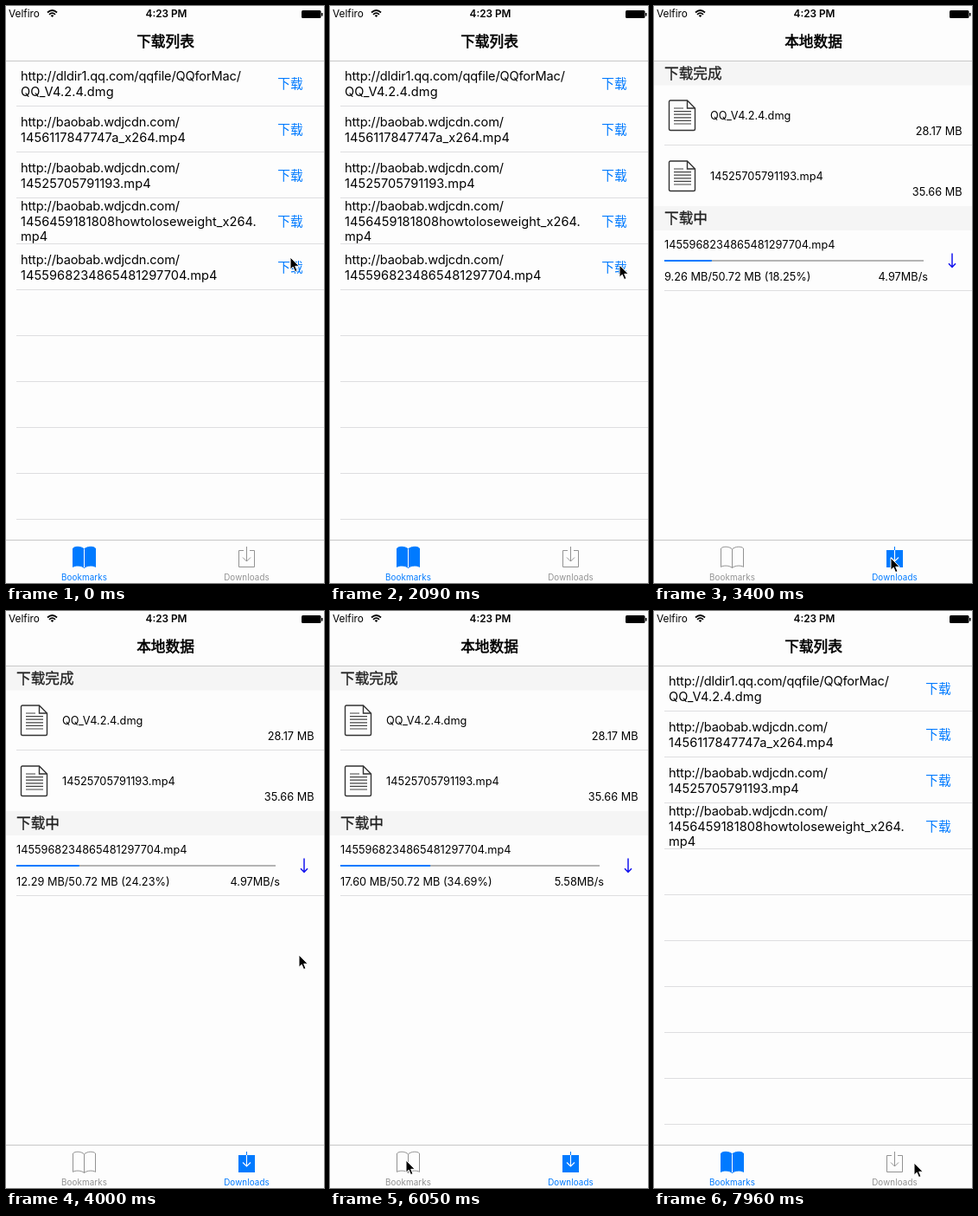
An HTML page for the animation above (8000 ms loop, 368 by 666 pixels).

```html
<!DOCTYPE html>
<html lang="zh-CN">
<head>
<meta charset="utf-8">
<style>
  html, body { margin: 0; width: 100%; height: 100%; overflow: hidden; background: #fdfdfd; }
  svg { display: block; width: 368px; height: 666px; }
  text { font-family: Inter, "Noto Sans CJK SC", "Noto Sans CJK", sans-serif; white-space: pre; }
  .status { font-size: 11.8px; }
  .title { font-size: 16.7px; text-anchor: middle; stroke: #000; stroke-width: .6px; }
  .host { font-size: 14.6px; letter-spacing: -.15px; }
  .file { font-size: 14.6px; letter-spacing: .06px; }
  .action { font-size: 14.7px; fill: #007aff; text-anchor: middle; }
  .head { font-size: 16.7px; fill: #222; stroke: #222; stroke-width: .3px; }
  .small { font-size: 12.75px; }
  .end { text-anchor: end; }
  .tab { font-size: 9.8px; letter-spacing: .12px; text-anchor: middle; }
</style>
</head>
<body>
<svg id="stage" viewBox="0 0 368 666"></svg>
<script>
const BLUE = '#007aff', GREY = '#929292', PAPER = '#fdfdfd', BAND = '#f5f5f5', EDGE = '#c8c8c8';
const LOOP = 8000, ROW = 53, LINE = 17.6;

const text = (cls, x, y, str, extra = '') => `<text class="${cls}" x="${x}" y="${y}" ${extra}>${str}</text>`;
const rect = (x, y, w, h, fill, extra = '') =>
  `<rect x="${x}" y="${y}" width="${w}" height="${h}" fill="${fill}" ${extra}/>`;
const path = (d, stroke, width = 1, fill = 'none') =>
  `<path d="${d}" stroke="${stroke}" stroke-width="${width}" fill="${fill}"/>`;
const group = (transform, body) => `<g transform="${transform}">${body}</g>`;
const rule = (x, y, color = '#dedee0') => rect(x, y, 368 - x, 1, color);
const title = str => text('title', 184.5, 47, str);
const section = (y, str) => rect(0, y, 368, 28, BAND) + text('head', 12, y + 20, str);

const urls = [
  ['http://dldir1.qq.com/qqfile/QQforMac/', 'QQ_V4.2.4.dmg'],
  ['http://baobab.wdjcdn.com/', '1456117847747a_x264.mp4'],
  ['http://baobab.wdjcdn.com/', '14525705791193.mp4'],
  ['http://baobab.wdjcdn.com/', '1456459181808howtoloseweight_x264.', 'mp4'],
  ['http://baobab.wdjcdn.com/', '1455968234865481297704.mp4'],
];

function urlRow(lines, i) {
  const middle = 89.5 + ROW * i;
  const body = lines.map((line, k) =>
    text(k ? 'file' : 'host', 17, middle + (k - (lines.length - 1) / 2) * LINE + 5.2, line));
  return `<g id="row${i}">${body.join('')}${text('action', 329, middle + 5.5, '下载')}</g>`;
}

function fileRow(y, name, size) {
  const lines = Array.from({ length: 6 }, (_, k) => `M6 ${9.5 + k * 3.6}h${k ? 20 : 11}`).join('');
  const sheet = path('M2 .5H21.5L30.5 9.5V33.5Q30.5 35 29 35H2Q.5 35 .5 33.5V2Q.5 .5 2 .5ZM21.5 .5V9.5H30.5', '#333', 1.4);
  return group(`translate(17 ${y + 17.5})`, sheet + path(lines, '#444', 1.2)) +
    text('small', 65, y + 39.5, name) + text('small end', 356.5, y + 58, size);
}

function bookIcon(active) {
  const page = path('M-13 2C-10.5 -.5 -3.5 -.5 0 3V24.5C-3.5 21.5 -10.5 21.5 -13 23.5Z',
    active ? BLUE : GREY, 1, active ? BLUE : 'none');
  return group('translate(90.5 624)', page + group('scale(-1 1)', page) +
    (active ? path('M0 3V24', PAPER) : ''));
}

function boxIcon(active) {
  const arrow = 'M0 4V17M-4.5 12.5L0 17L4.5 12.5';
  return group('translate(278.5 624)', active
    ? rect(-9.5, 4, 19, 20, BLUE) + path('M0 0V4', BLUE) + path(arrow, '#fff', 1.1)
    : path('M-3.5 4.5H-9V23.5H9V4.5H3.5M0 0V4' + arrow, GREY));
}

const tabs = active => bookIcon(active === 0) + boxIcon(active === 1) +
  ['Bookmarks', 'Downloads'].map((label, i) =>
    text('tab', 90.5 + 188 * i, 662.5, label, `fill="${i === active ? BLUE : GREY}"`)).join('');

const statusBar = text('status', 3, 13, 'Velfiro') +
  path('M48 7.5Q53.5 2.5 59 7.5M50 9.8Q53.5 6.6 57 9.8', '#000', 1.7) +
  path('M51.6 11L53.5 13L55.4 11Q53.5 9.4 51.6 11Z', 'none', 0, '#000') +
  text('status', 185.5, 13, '4:23 PM', 'text-anchor="middle" font-weight="600"') +
  rect(342, 5, 22.5, 9, '#000', 'rx="1.5"') + rect(365, 8, 1.5, 3.5, '#000');

const bookmarks = title('下载列表') + urls.map(urlRow).join('') +
  Array.from({ length: 10 }, (_, i) => rule(12, 115 + ROW * i)).join('') + tabs(0);

const downloads = title('本地数据') + section(63.5, '下载完成') +
  fileRow(91, 'QQ_V4.2.4.dmg', '28.17 MB') + rule(12, 160) +
  fileRow(161, '14525705791193.mp4', '35.66 MB') +
  section(231, '下载中') + text('small', 12, 279.5, '1455968234865481297704.mp4') +
  rect(12, 293, 300, 2, '#b4b4b4') + rect(12, 293, 0, 2, BLUE, 'id="bar"') +
  text('small', 12, 317, '', 'id="amount"') + text('small end', 317, 317, '', 'id="speed"') +
  path('M345 285.5V301.5M341 297.2L345 301.5L349 297.2', '#1414ee', 1.5) +
  rule(12, 328) + tabs(1);

const $ = id => document.getElementById(id);
$('stage').innerHTML = rect(0, 0, 368, 666, PAPER) + statusBar +
  `<g id="bookmarks">${bookmarks}</g><g id="downloads">${downloads}</g>` +
  rule(0, 63, EDGE) + rule(0, 616, EDGE) +
  `<g id="cursor">${path('M0 0V14.2L3.2 11.2L5.5 16.6L8 15.6L5.7 10.3H10.2Z', '#fff', 1, '#000')}</g>`;

const BEAT = 146.75, OFFSET = 25;
const snap = t => OFFSET + Math.floor((t - OFFSET) / BEAT) * BEAT;

// Places where the pointer rests; it eases from one to the next.
const stops = [
  { x: 329, y: 290, arrive: 0, leave: 300 },
  { x: 324, y: 297, arrive: 500, leave: 600 },
  { x: 331, y: 299, arrive: 890, leave: 1640 },
  { x: 335, y: 299, arrive: 2070, leave: 2380 },
  { x: 274, y: 637, arrive: 2980, leave: 3550 },
  { x: 339, y: 397, arrive: 3980, leave: 4440 },
  { x: 352, y: 302, arrive: 5010, leave: 5320 },
  { x: 88, y: 634, arrive: 6030, leave: 6200 },
  { x: 334, y: 195, arrive: 6900, leave: 7210 },
  { x: 301, y: 637, arrive: 7810, leave: LOOP },
];

const clamp = u => Math.min(1, Math.max(0, u));
const mix = (a, b, u) => a + (b - a) * u;
const ease = u => u * u * (3 - 2 * u);

function pointer(t) {
  const i = stops.findIndex(stop => t < stop.leave);
  const to = stops[i], from = stops[i - 1] || to;
  const u = ease(clamp((t - from.leave) / (to.arrive - from.leave)));
  return [mix(from.x, to.x, u), mix(from.y, to.y, u)].map(Math.round);
}

function draw(now) {
  const t = Math.max(0, snap(now % LOOP));
  const onDownloads = t > 3350 && t < 6150;
  $('bookmarks').style.display = onDownloads ? 'none' : '';
  $('downloads').style.display = onDownloads ? '' : 'none';
  $('row4').style.display = t < 2200 ? '' : 'none';

  // The download is paused once the pointer reaches its arrow.
  const total = 50.72, progress = Math.min(1, (t - snap(4000)) / (BEAT * 7));
  const loaded = Math.max(0, mix(12.29, 17.596, progress)), share = loaded / total;
  $('bar').setAttribute('width', 300 * share);
  $('amount').textContent = `${loaded.toFixed(2)} MB/${total} MB (${(100 * share).toFixed(2)}%)`;
  $('speed').textContent = `${mix(4.97, 5.58, clamp(progress)).toFixed(2)}MB/s`;

  $('cursor').setAttribute('transform', `translate(${pointer(t)})`);
}

const start = performance.now();
function tick() {
  draw(performance.now() - start);
  requestAnimationFrame(tick);
}
tick();
</script>
</body>
</html>
```
